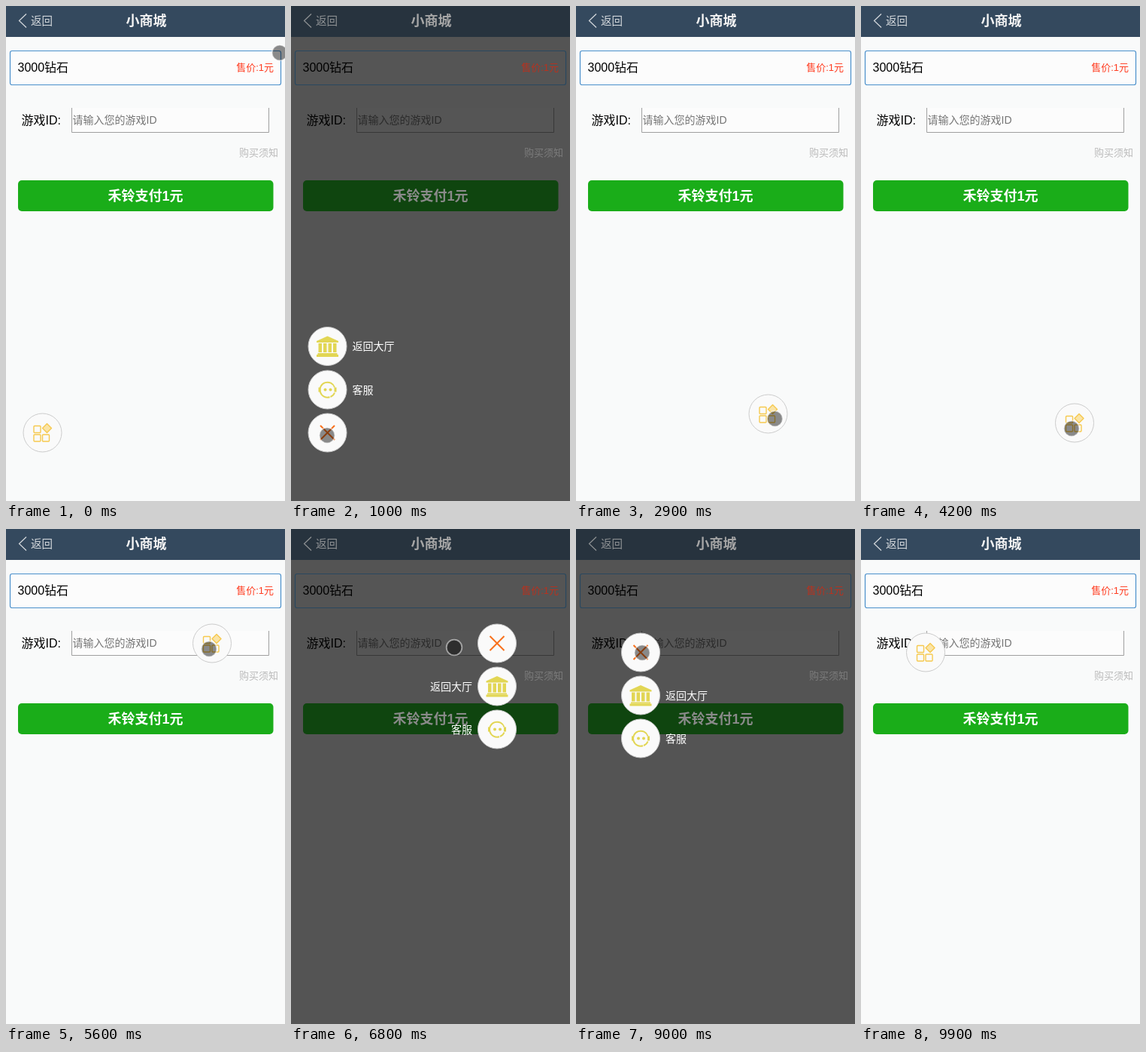
An HTML page that plays this animation: 371x656 px, repeating every 10 s.

```html
<!DOCTYPE html>
<html lang="zh-CN">
<head>
<meta charset="utf-8">
<title>小商城</title>
<style>
  html, body { margin: 0; width: 100%; height: 100%; overflow: hidden; background: #f9f9f9; }
  svg {
    display: block; width: 371px; height: 656px;
    font-family: "Liberation Sans", "Noto Sans CJK SC", "Noto Sans CJK", sans-serif;
    --page: #f9fafa; --card: #fcfcfc; --edge: #4a90cc; --head: #34495e; --title: #f4f4f4; --back: #d5d9dd;
    --price: #ff3b1f; --field: #a0a0a0; --hint: #757575; --note: #bbb; --pay: #1aad19; --payText: #fff;
  }
  svg.dim {
    --page: #545454; --card: #555; --edge: #29485f; --head: #27333e; --title: #a6a6a6; --back: #8f9294;
    --price: #b8321f; --field: #383838; --hint: #2b2b2b; --note: #7c7c7c; --pay: #0f450f; --payText: #8a8a8a;
  }
  .disc { fill: #fafafa; stroke: #ccc; }
  .label { font-size: 14px; fill: #fff; }
  .gold { fill: #e2d654; }
  .line { fill: none; stroke: #e2d654; }
</style>
</head>
<body>
<svg id="stage" viewBox="0 0 371 656">
  <rect width="371" height="656" fill="var(--page)"/>

  <rect width="371" height="41" fill="var(--head)"/>
  <path d="M27 10.5l-9.5 9l9.5 9" fill="none" stroke="var(--back)" stroke-width="1.2"/>
  <text x="33" y="25" font-size="14.5" font-weight="300" fill="var(--back)">返回</text>
  <text x="186.5" y="25.5" font-size="18" font-weight="600" text-anchor="middle" fill="var(--title)">小商城</text>

  <rect x="5.5" y="59.5" width="360" height="45" rx="2.5" fill="var(--card)" stroke="var(--edge)" stroke-width="1.2"/>
  <text x="15.5" y="87" font-size="16">3000钻石</text>
  <text x="356" y="86" font-size="13" text-anchor="end" fill="var(--price)">售价:1元</text>

  <text x="20.5" y="157" font-size="16">游戏ID:</text>
  <path d="M87.5 135v32.5h262v-32.5" fill="var(--card)" stroke="var(--field)"/>
  <text x="88.5" y="156" font-size="14" fill="var(--hint)">请输入您的游戏ID</text>
  <text x="362" y="199" font-size="13" text-anchor="end" fill="var(--note)">购买须知</text>

  <rect x="16" y="231" width="339.5" height="41" rx="5" fill="var(--pay)"/>
  <text x="185.5" y="257.5" font-size="18" font-weight="600" text-anchor="middle" fill="var(--payText)">禾铃支付1元</text>

  <g id="lobby">
    <circle class="disc" r="25.5"/>
    <path class="gold" d="M-14.5 -5v-2L0 -13.5L14.5 -7v2z"/>
    <path class="line" d="M-12 2h24" stroke-width="12" stroke-dasharray="4.5 2"/>
    <path class="line" d="M-13 10h26" stroke-width="2"/>
    <path class="line" d="M-14.5 12.5h29" stroke-width="3"/>
    <text class="label" y="5">返回大厅</text>
  </g>
  <g id="service">
    <circle class="disc" r="25.5"/>
    <path class="line" d="M9.5 -3A10 10 0 1 0 3 9.7M9.5 4Q8 8 4 9.5" stroke-width="2"/>
    <path class="line" d="M-10.5 -3v6m21 -6v6" stroke-width="3"/>
    <circle class="gold" cx="-3" r="2"/><circle class="gold" cx="4" r="2"/>
    <text class="label" y="5">客服</text>
  </g>
  <g id="button">
    <circle class="disc" r="25.5"/>
    <g id="tiles" fill="none" stroke="#f6c94e" stroke-width="1.4">
      <rect x="-11.5" y="-9" width="9" height="9" rx="1"/>
      <rect x="-11.5" y="2.5" width="9" height="9" rx="1"/>
      <rect y="2.5" width="9" height="9" rx="1"/>
      <path d="M6 -12l6 6l-6 6l-6 -6z" fill="#fae4a6" stroke-linejoin="round"/>
    </g>
    <path id="cross" d="M-9.5 -9.5l19 19m0 -19l-19 19" stroke="#f8701c" stroke-width="2"/>
  </g>

  <circle id="cursor" r="10.3" fill="#000" fill-opacity=".45" stroke="#fff" stroke-opacity=".5" stroke-width="1.8"/>
</svg>
<script>
const LOOP = 10000, STEP = 100;
const el = id => document.getElementById(id);
const place = (id, x, y) => el(id).setAttribute("transform", `translate(${x} ${y})`);
const show = (id, on) => el(id).style.display = on ? "" : "none";

// Cursor moves: from, to (ms), then the point reached; it rests in between.
const moves = [
  [0, 200, 178, 425], [300, 800, 48, 569],
  [1000, 1400, 66, 456], [1400, 1900, 57, 568], [2100, 2400, 57.5, 572],
  [2500, 2700, 105, 559], [2700, 2900, 264.5, 547], [2900, 3100, 293, 559],
  [3200, 3500, 286, 500], [3500, 3800, 280, 560],
  [4700, 5100, 295, 390], [5100, 5300, 252, 265], [5300, 5600, 270, 159],
  [6100, 6300, 292, 141], [6500, 6800, 217, 157], [7000, 7400, 276, 152.5],
  [7500, 7900, 152, 172], [7900, 8200, 88, 164.5],
  [8400, 8700, 94, 270], [8700, 9000, 88, 164], [9400, 9900, 390, 120]
];
// Drags: from, to (ms), then the cursor's offset from the button centre.
const drags = [[2500, 3100, 9, 6.5], [4700, 5600, -4, 7.5], [7500, 8200, 2, 1]];
const openSpans = [[1000, 2100], [3300, 4200], [5900, 7000], [8400, 9400]];

function cursorAt(t) {
  let x = 364, y = 62;
  for (const [from, to, toX, toY] of moves) {
    if (t < from) break;
    const k = Math.min(1, (t - from) / (to - from));
    x += (toX - x) * k;
    y += (toY - y) * k;
  }
  return [x, y];
}

function buttonAt(t) {
  const [from, to, dx, dy] = drags.findLast(drag => t >= drag[0]) || drags[0];
  const [x, y] = cursorAt(Math.max(from, Math.min(to, t)));
  return [x - dx, y - dy];
}

// Labels face the middle of the page.
function placeItem(id, x, y) {
  const label = el(id).querySelector("text"), onRight = x > 185;
  place(id, x, y);
  label.setAttribute("x", onRight ? -33 : 33);
  label.setAttribute("text-anchor", onRight ? "end" : "start");
}

function render(now) {
  const t = Math.floor(now % LOOP / STEP) * STEP;
  const [x, y] = buttonAt(t);
  const open = openSpans.some(([from, to]) => t >= from && t < to);
  const lower = y > 328;

  el("stage").classList.toggle("dim", open);
  place("button", x, y);
  placeItem("lobby", x, y + (lower ? -114.5 : 57));
  placeItem("service", x, y + (lower ? -57 : 114));
  for (const id of ["lobby", "service", "cross"]) show(id, open);
  show("tiles", !open);
  place("cursor", ...cursorAt(t));
}

const start = performance.now();
function tick() {
  render(performance.now() - start);
  requestAnimationFrame(tick);
}
tick();
</script>
</body>
</html>
```
